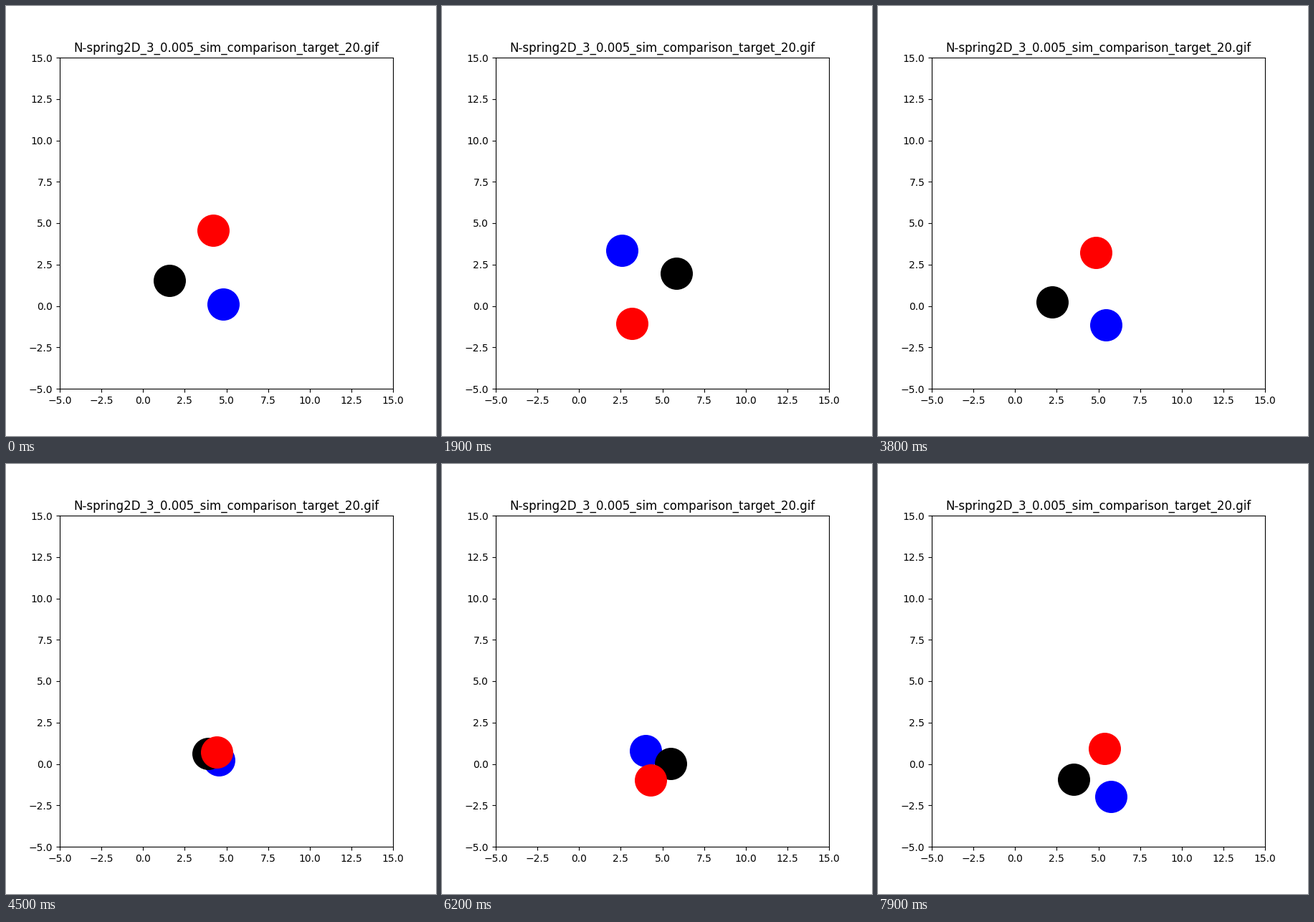
A matplotlib script for the animation above (8000 ms loop, 600 px wide and 600 px high).

```python
import numpy as np
import matplotlib.pyplot as plt
from matplotlib.animation import FuncAnimation

FRAMES, INTERVAL = 80, 100
OMEGA = 0.1679          # radians per frame

# Centre of mass moves in a straight line
START = np.array([3.542, 2.071])
DRIFT = np.array([0.01689, -0.03442])

# Cosine and sine amplitudes of each ball, drawn from back to front,
# and their slow change in y
COLORS = ["blue", "black", "red"]
COS = np.array([[1.285, -1.960], [-1.968, -0.528], [0.683, 2.488]])
SIN = np.array([[-0.138, 0.286], [0.209, 0.242], [-0.071, -0.528]])
GROW = np.array([[0, 0], [0, -0.00122], [0, 0.00122]])


def positions(i):
    a = OMEGA * i
    swing = (COS + GROW * i) * np.cos(a) + (SIN - GROW * i) * np.sin(a)
    return START + DRIFT * i + swing


fig, ax = plt.subplots(figsize=(6, 6), dpi=100)
ax.set_xlim(-5, 15)
ax.set_ylim(-5, 15)
ax.set_title("N-spring2D_3_0.005_sim_comparison_target_20.gif")
balls = [ax.plot([], [], "o", color=c, ms=32.4, mew=0)[0] for c in COLORS]


def update(i):
    for ball, (x, y) in zip(balls, positions(i)):
        ball.set_data([x], [y])
    return balls


anim = FuncAnimation(fig, update, frames=FRAMES, interval=INTERVAL,
                     repeat=True, repeat_delay=0)
plt.show()
```
